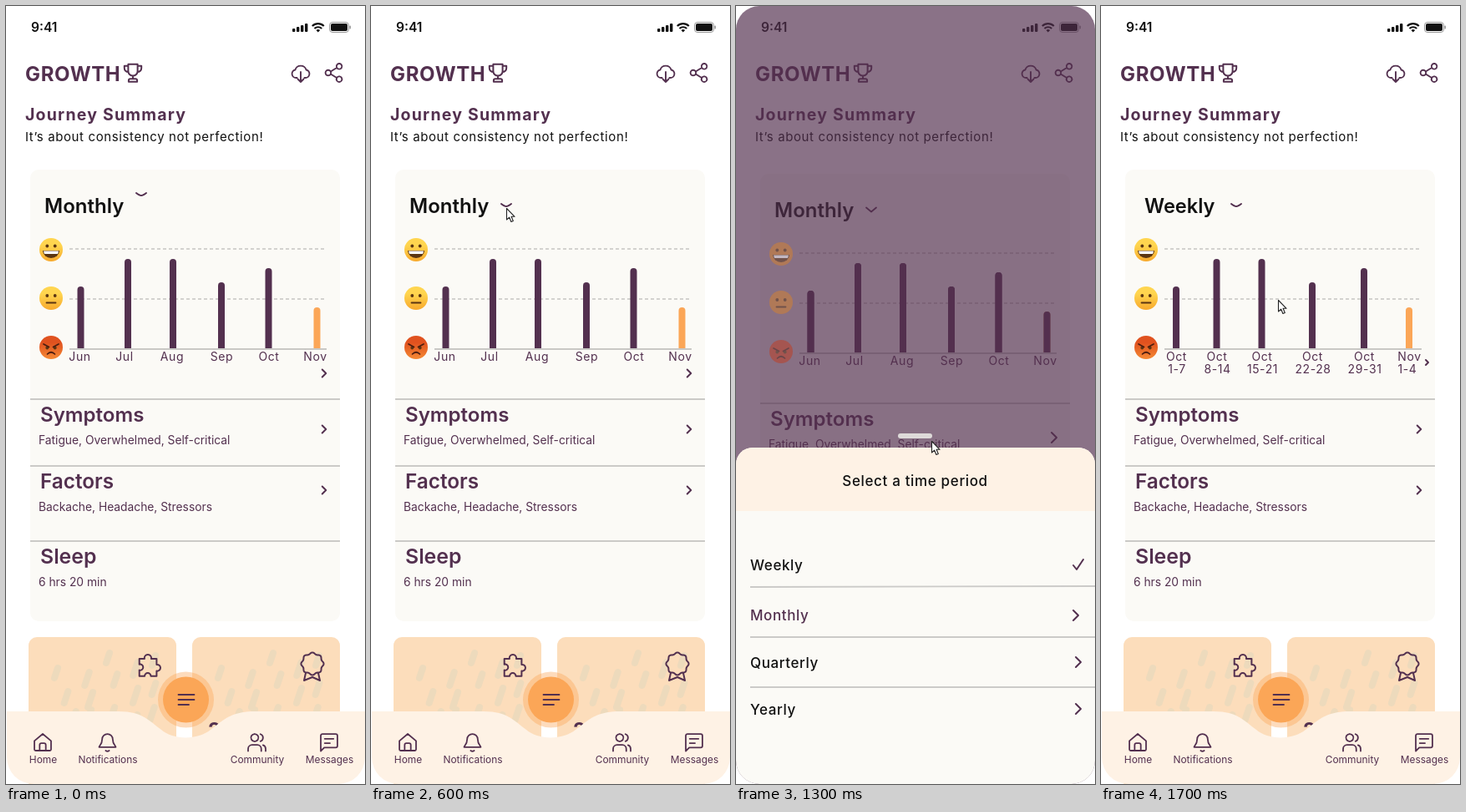
Recreate the animation shown at these times as an HTML page. Size 430x932 px, loop 1800 ms.

```html
<!DOCTYPE html>
<html lang="en">
<head>
<meta charset="utf-8">
<title>Growth journey</title>
<style>
html, body { margin: 0; width: 100%; height: 100%; overflow: hidden; background: #fff; }
svg { display: block; width: 430px; height: 932px; font-family: Inter, "Open Sans", sans-serif; }
</style>
</head>
<body>
<svg id="stage" viewBox="0 0 430 932" xmlns="http://www.w3.org/2000/svg"></svg>
<script>
const PLUM = '#53304f', INK = '#111', PAPER = '#fbfaf6', PEACH = '#fcddbb', ORANGE = '#fba657';
const stage = document.getElementById('stage');

// --- drawing helpers ---
const text = (x, y, str, size, o = {}) =>
  `<text x="${x}" y="${y}" font-size="${size}" fill="${o.fill || PLUM}" font-weight="${o.w || 400}" ` +
  `letter-spacing="${o.ls || 0}" text-anchor="${o.mid ? 'middle' : 'start'}"` +
  `${o.line ? ' text-decoration="underline"' : ''}>${str}</text>`;
const rect = (x, y, w, h, r, fill) =>
  `<rect x="${x}" y="${y}" width="${w}" height="${h}" rx="${r}" fill="${fill}"/>`;
const disc = (x, y, r, fill) => `<circle cx="${x}" cy="${y}" r="${r}" fill="${fill}"/>`;
const line = (d, w = 2, color = PLUM, extra = '') =>
  `<path d="${d}" fill="none" stroke="${color}" stroke-width="${w}" stroke-linejoin="round" ${extra}/>`;
const pen = (d, w = 2, color = PLUM) => line(d, w, color, 'stroke-linecap="round"');
const icon = (d, x, y, k = 1, w = 1.9) =>
  `<g transform="translate(${x} ${y}) scale(${k}) translate(-12 -12)">${pen(d, w / k)}</g>`;
const group = (id, body) => `<g id="${id}">${body}</g>`;
const next = (x, y, h = 9) => pen(`M${x - h / 4} ${y - h / 2}l${h / 2} ${h / 2}l${-h / 2} ${h / 2}`);
const tick = (x, y) => pen(`M${x - 6} ${y + 1}l4 5 8-12`);

// --- icons on a 24 unit box ---
const ICON = {
  cup: 'M6.5 2h11v8a5.5 5.5 0 0 1-11 0zM6.5 4H2v2.5A4.5 4.5 0 0 0 6.7 11M17.5 4H22v2.5a4.5 4.5 0 0 1-4.7 4.5M12 15.5V19M7 22.5V21a2 2 0 0 1 2-2h6a2 2 0 0 1 2 2v1.5z',
  cloud: 'M7.5 17H6.500A4.8 4.8 0 0 1 5.4 7.5a6.9 6.9 0 0 1 13.2 0A4.8 4.8 0 0 1 17.5 17h-1M12 10v12M8.5 18.5l3.5 3.5 3.5-3.5',
  share: 'M18 2a3 3 0 1 0 .01 0M6 9a3 3 0 1 0 .01 0M18 16a3 3 0 1 0 .01 0M8.7 10.6l6.6-4M8.7 13.4l6.6 4',
  home: 'M2.5 10.5 12 2.5l9.5 8V20a1.5 1.5 0 0 1-1.5 1.5H4A1.5 1.5 0 0 1 2.5 20zM8.5 21.5V15a2 2 0 0 1 2-2h3a2 2 0 0 1 2 2v6.5',
  bell: 'M18 8.5a6 6 0 0 0-12 0c0 6-3.5 7.5-3.5 9h19c0-1.5-3.5-3-3.5-9M10 21.5q2 1.5 4 0',
  people: 'M2 22v-2.5a4.5 4.5 0 0 1 4.5-4.5h6a4.5 4.5 0 0 1 4.5 4.5V22M9.5 2.5a4.3 4.3 0 1 0 .01 0M16 2.7a4.3 4.3 0 0 1 0 8.2M22 22v-2.5a4.5 4.5 0 0 0-3-4.2',
  chat: 'M2.5 22V4.5a2 2 0 0 1 2-2h15a2 2 0 0 1 2 2v11.5a2 2 0 0 1-2 2H6.5zM7 8h10M7 13h6',
  puzzle: 'M2 7h4.5a3 3 0 1 1 5.8 0H17v5a2.8 2.8 0 1 1 0 5.5V22h-5a2.7 2.7 0 1 0-5.4 0H2v-5.2a2.6 2.6 0 1 0 0-5z',
  heart: 'M12 22 3 13A6 6 0 0 1 12 5a6 6 0 0 1 9 8zM7.5 12h2l1.5-3 2 6 1.5-3h2',
  book: 'M12 5.5Q10 2.5 7 2.5H2V19h6q3 0 4 2.5 1-2.5 4-2.5h6V2.5h-5q-3 0-5 3zV21',
  goal: 'M14 2.3A10 10 0 1 0 21.7 10M13 6.6A5.6 5.6 0 1 0 17.4 11M12 12l6-6V2.5l3-1.5.5 2.5 2 .5-2 3H18M12 11.5v1'
};

// --- faces, drawn around 0,0 with radius 14 ---
const eyes = (y, r) => disc(-4.7, y, r, '#5b3512') + disc(4.7, y, r, '#5b3512');
const face = (x, y, fill, body, k = 1) =>
  `<g transform="translate(${x} ${y}) scale(${k})">${disc(0, 0, 14, fill) + body}</g>`;
const grin = '<path d="M-10 1H10A10 9 0 0 1-10 1" fill="#5b3512"/><path d="M-9 1.5H9L8 5H-8z" fill="#fff"/>' + eyes(-4.5, 1.9);
const flat = eyes(-3, 1.9) + pen('M-5.5 5.5h11', 1.8, '#5b3512');
const cross = eyes(.5, 1.9) + pen('M-9-4l6.5 3.5M9-4 2.5-.5M-4.5 8q4.5-4.5 9 0', 1.7, '#4c1d10');
const cool = '<path d="M-13-5H13V-2Q11 4 6 3 2 2 1-2H-1Q-2 2-6 3-11 4-13-2z" fill="#2b2522"/>' + pen('M-6 6q6 5 12 0', 1.6, '#5b3512');
const moods = (good, bad) => face(54, 292, good, grin) + face(54, 350, good, flat) + face(54, 409, bad, cross);

// --- chart ---
const TOPS = [336, 303, 303, 331, 314, 361];
const bars = (xs, last) => xs.map((x, i) =>
  `<path d="M${x - 4} 410V${TOPS[i] + 4}a4 4 0 0 1 8 0V410z" fill="${i == 5 ? last : PLUM}"/>`).join('');
const label = (x, y, s) => text(x, y, s, 14, { mid: 1, ls: .6 });
const MONTH_X = [89.5, 146, 200, 258, 314.5, 372.5], WEEK_X = [90, 138.5, 192.5, 253, 315, 369];
const monthNames = [['Jun', 88.5], ['Jul', 142], ['Aug', 199], ['Sep', 258.5], ['Oct', 315], ['Nov', 370.5]]
  .map(([s, x]) => label(x, 425, s)).join('');
const weekNames = ['1-7', '8-14', '15-21', '22-28', '29-31', '1-4'].map((s, i) =>
  label(WEEK_X[i] + .5, 425, i < 5 ? 'Oct' : 'Nov') + label(WEEK_X[i] + (i < 5 ? 1 : -2), 440, s)).join('');

const section = (y, name, detail, size) =>
  line(`M29 ${y}H400`, 2, '#cbcac7') + text(41, y + 27, name, size, { w: 600 }) + text(39, y + 54, detail, 13.8);

const summary =
  rect(29, 196, 371, 541, 10, PAPER) +
  line('M76 291H384M76 351H384', 1.6, '#c6c5c2', 'stroke-dasharray="4 3"') +
  section(471, 'Symptoms', 'Fatigue, Overwhelmed, Self-critical', 24.1) +
  section(551, 'Factors', 'Backache, Headache, Stressors', 24.3) +
  section(641, 'Sleep', '6 hrs 20 min', 24.8) +
  group('monthly', text(46, 248, 'Monthly', 24, { w: 600, fill: INK }) + bars(MONTH_X, ORANGE) + monthNames) +
  group('dimBar', bars(MONTH_X, PLUM)) +
  group('weekly', text(52, 248, 'Weekly', 23.6, { w: 600, fill: INK }) + bars(WEEK_X, ORANGE) + weekNames + next(390.5, 427, 6)) +
  line('M76 411H384', 2, '#c9c8c5') +
  group('caret', pen('M156-1.5Q160 1.5 162 1.500 164 1.500 168-1.5')) +
  group('wideCaret', pen('M156 236.500l6 5 6-5', 1.8)) +
  group('arrows', next(381, 507) + next(381, 580)) +
  group('chartArrow', next(381, 440)) +
  group('bigArrows', next(381, 512, 12) + next(381, 597, 12) + next(381, 690, 12));

// --- lower half ---
const STREAKS = [[33, 43], [45, 72], [70, 50], [74, 75], [95, 25], [104, 51], [128, 38], [128, 70], [150, 28],
  [150, 62], [54, 97], [72, 96], [101, 90], [128, 100], [148, 92], [35, 122], [55, 142], [90, 128], [118, 120], [140, 130], [104, 148]];
const streaks = STREAKS.map(([x, y], i) => {
  const h = 6 + i * 5 % 4;
  return `M${x + h / 3} ${y - h}L${x - h / 3} ${y + h}`;
}).join('');
const card = (x, num, name, ls) => `<g transform="translate(${x} 116)">` + rect(0, 0, 177, 183.5, 10, PEACH) +
  pen(streaks, 8, 'rgba(214,212,188,.42)') + text(19, 120, num, 24, { w: 700 }) +
  text(19.5, 146, name, 13, { ls, fill: '#35202f' }) + '</g>';
const badge = Array.from({ length: 73 }, (_, i) => {
  const a = i * Math.PI / 36, r = 12.7 + .9 * Math.cos(8 * a);
  return (i ? 'L' : 'M') + (369 + r * Math.cos(a)).toFixed(1) + ' ' + (148 + r * Math.sin(a)).toFixed(1);
}).join('') + 'M361 159l-2 9 10-4 9 4-2-9';

const ring = (x, y, color, part) => {
  const r = 28.75, len = 2 * Math.PI * r;
  const arc = (c, dash) => `<circle cx="${x}" cy="${y}" r="${r}" fill="none" stroke="${c}" stroke-width="17.5" ` +
    `stroke-dasharray="${dash}" transform="rotate(-90 ${x} ${y})"/>`;
  return disc(x, y, 21, '#fff') + arc('#bbb7b5', 'none') + arc(color, `${len * part} ${len}`);
};
const caption = (x, a, b) => text(x, 457, a, 14, { mid: 1 }) + text(x, 472, b, 14, { mid: 1 });
const task = (y, name, pic, from, to, dashY) => icon(ICON[pic], 50, y - 8, 1.15, 2) +
  text(72, y, name, 19, { ls: .5 }) + line(`M${from} ${dashY}H${to}`, 2, PLUM, 'stroke-dasharray="5 3"');
const tally = (x, y, num, unit, fill, dy = 0) =>
  text(277, y + dy, num, 22.5, { w: 700, fill }) + text(x, y, unit, 20, { fill, ls: .6 });
const zed = (x, y, s) => text(x, y, 'Z', s, { w: 800, fill: '#1754c4' });

const lower =
  card(29, '15', 'In Progress Journey', .3) + card(225, '22', 'Goals completed', .4) +
  icon(ICON.puzzle, 175.5, 149, 1.38, 2) + pen(badge, 2) +
  rect(28, 322, 372, 366, 10, PAPER) +
  text(39, 348, 'PROGRESS', 16, { w: 500, ls: 1.1 }) + text(349, 348, 'More', 14, { ls: .4, line: 1 }) +
  ring(115.5, 403, ORANGE, .76) + ring(215.5, 403, 'url(#red)', .54) + ring(314.5, 402, 'url(#blue)', .54) +
  '<path d="M106 391q5-4 8 0l-1 5q-3 0-3 3l2 6q5-6 11-2 5 4 3 11-10 4-23 0 0-10 3-23z" fill="#f6b93c" stroke="#c98a22" stroke-width=".8"/>' +
  face(214.5, 403, 'url(#sun)', cool, .8) +
  zed(301, 414, 17) + zed(311.5, 405, 13) + zed(319, 397, 10) +
  caption(113, 'Boost my', 'energy') + caption(213, 'Build', 'confidence') + caption(312.5, 'Power', 'nap') +
  text(38, 517, 'KEEP IT UP!', 16, { w: 500, ls: .8 }) + text(346, 516, 'Today', 14, { ls: .4, line: 1 }) +
  task(559, 'MOVEMENT', 'heart', 199, 267, 549) + task(598, 'MAKE FOOD', 'book', 201, 268, 586.5) +
  task(640, 'GOALS DONE', 'goal', 214, 270, 632) +
  tally(312, 560, '45', 'min', '#95a988') + tally(293, 598, '1', 'dish', '#d8b27a') +
  tally(309.5, 640, '15', 'finished', '#c4361d', 3) +
  text(183, 674, 'more', 17, { w: 500, ls: .6 }) + pen('M232 667.5q6 6 12 0', 2.2) +
  rect(29, 712, 164, 84, 10, PAPER) + rect(218, 712, 184, 84, 10, PAPER) +
  text(49, 736.5, 'Total\u00a0 Adventure Days', 11.4, { w: 600, fill: INK, ls: .05 }) +
  text(241, 736.5, 'Total Events attended', 11.5, { w: 600, fill: INK, ls: .65 }) +
  text(67, 777.5, '28 Days', 22.5, { w: 600, fill: INK }) + text(260.5, 779, '2 Events', 22.8, { w: 600, fill: INK });

// --- fixed parts ---
const header =
  text(30, 31, '9:41', 15.6, { w: 600, fill: INK }) +
  [4, 6, 8, 10].map((h, i) => rect(343 + i * 5, 31 - h, 3.4, h, 1, INK)).join('') +
  line('M366.8 24a10 10 0 0 1 14 0M369.5 27a6.3 6.3 0 0 1 8.7 0', 2.2, INK) +
  '<path d="M371.5 29a3.5 3.5 0 0 1 4.7 0l-2.4 2.5z" fill="#111"/>' +
  '<rect x="387.5" y="19.5" width="23" height="12" rx="3.5" fill="none" stroke="#999"/>' +
  rect(389, 21, 20, 9, 2, INK) + rect(411.5, 23.5, 1.5, 4, .7, '#999') +
  text(23, 90, 'GROWTH', 24, { w: 700, ls: .65 }) + icon(ICON.cup, 152, 80, 1.02, 2) +
  icon(ICON.cloud, 353, 81, 1) + icon(ICON.share, 392.5, 80, 1.1);
const title = text(23, 137, 'Journey Summary', 19.5, { w: 700, ls: 1.2 }) +
  text(23, 162, 'It’s about consistency not perfection!', 15, { ls: .62, fill: INK });
const tab = (x, pic, name) => icon(ICON[pic], x, 882, 1.05, 1.8) + text(x + .5, 907, name, 11.9, { mid: 1 });
const nav =
  '<path d="M1 845H135C164 845 172 857 186 867 200 879.5 230 879.5 245 867 259 857 268 845 298 845H430V900A32 32 0 0 1 398 932H33A32 32 0 0 1 1 900z" fill="#fef2e5"/>' +
  disc(215.5, 831, 33.5, 'rgba(251,166,87,.4)') + disc(215.5, 831, 27.5, ORANGE) +
  pen('M206.5 825H225.5M206.5 831H225.5M206.5 837H219', 1.8) +
  tab(44, 'home', 'Home') + tab(121.5, 'bell', 'Notifications') + tab(300.5, 'people', 'Community') + tab(387, 'chat', 'Messages');
const row = (y, name, fill) => text(17, y, name, 17, { w: 500, ls: .6, fill });
const sheet =
  rect(194, -17, 41, 6, 3, '#dedad9') +
  '<path d="M0 420V20A20 20 0 0 1 20 0H410A20 20 0 0 1 430 20V420z" fill="#fbfaf6"/>' +
  '<path d="M0 76V20A20 20 0 0 1 20 0H410A20 20 0 0 1 430 20V76z" fill="#fef2e5"/>' +
  text(214.5, 46, 'Select a time period', 17, { w: 500, mid: 1, ls: .65, fill: INK }) +
  row(147, 'Weekly', INK) + row(207, 'Monthly', PLUM) + row(264, 'Quarterly', INK) + row(320, 'Yearly', INK) +
  line('M17 167 430 166M17 227H430M17 287H430', 1.8, '#cbcac8') +
  group('pickMonth', next(410, 140, 12) + tick(407, 201)) + group('pickWeek', tick(410, 140) + next(407, 201, 12)) +
  next(410, 257, 12) + next(410, 313, 12);

const fade = (id, a, b) => `<linearGradient id="${id}" x1="0" y1="0" x2="0" y2="1">` +
  `<stop offset=".3" stop-color="${a}"/><stop offset="1" stop-color="${b}"/></linearGradient>`;
stage.innerHTML =
  '<defs><clipPath id="phone"><rect width="430" height="932" rx="28"/></clipPath>' +
  fade('red', '#f08a70', '#e2442b') + fade('blue', '#5d96e4', '#1450bf') +
  fade('sun', '#ffd54f', '#f7a92d') + fade('mad', '#e0521f', '#f58a35') + '</defs>' +
  '<g clip-path="url(#phone)">' +
  group('upper', group('title', title) + group('panel', summary)) +
  group('lower', lower) + header + group('nav', nav) +
  group('shade', rect(0, 0, 430, 932, 0, PLUM)) +
  group('moods', moods('url(#sun)', 'url(#mad)')) + group('dimMoods', moods('#d9822b', '#c23a1c')) +
  group('sheet', sheet) + '</g>' +
  group('cursor', '<path d="M0 0V13.5L3.2 10.7 5.4 16 7.8 15 5.6 9.8H9.6z" fill="#fff" stroke="#222" stroke-width="1.1" stroke-linejoin="round"/>');

// --- motion ---
const el = id => document.getElementById(id);
const move = (id, x, y) => el(id).setAttribute('transform', `translate(${x} ${y})`);
const alpha = (id, v) => el(id).setAttribute('opacity', v);
const show = (id, on) => el(id).setAttribute('display', on ? 'inline' : 'none');
function track(keys, t) {
  let i = 0;
  while (i < keys.length - 2 && t > keys[i + 1][0]) i++;
  const [t0, a] = keys[i], [t1, b] = keys[i + 1];
  const p = Math.min(1, Math.max(0, (t - t0) / (t1 - t0)));
  return a + (b - a) * p * p * (3 - 2 * p);
}
const SCROLL = [[0, 0], [200, 1], [600, 0]];
const SHADE = [[600, 0], [800, .68], [1500, .68], [1700, 0]];
const SHEET_Y = [[600, 950], [800, 713], [900, 713], [1100, 529], [1300, 529], [1500, 960]];
const CURSOR_X = [[500, 190], [600, 162], [700, 162], [900, 246], [1100, 234], [1200, 62], [1300, 234], [1500, 234], [1700, 212]];
const CURSOR_Y = [[500, 330], [600, 242], [700, 242], [900, 702], [1100, 522], [1200, 670], [1300, 521], [1500, 521], [1700, 352]];

function draw(t) {
  const s = track(SCROLL, t), shade = track(SHADE, t), y = track(SHEET_Y, t);
  const modal = t >= 700 && t < 1600, week = t >= 1600, drop = modal ? 5 : 0;
  move('upper', 0, -640 * s);
  alpha('upper', 1 - s);
  move('panel', 0, drop);
  move('lower', 2 * s - 2, 640 * (1 - s) + (modal ? 27 : 0));
  move('moods', 0, -640 * s);
  alpha('moods', 1 - s);
  show('moods', !modal);
  move('dimMoods', 0, drop);
  alpha('dimMoods', 1 - shade * .74);
  show('dimMoods', modal);
  move('caret', 0, t < 600 ? 225.5 : 238.5);
  show('caret', !modal);
  show('wideCaret', modal);
  show('monthly', !week);
  show('weekly', week);
  show('dimBar', modal);
  show('arrows', !modal);
  show('chartArrow', !modal && !week);
  show('bigArrows', modal);
  alpha('nav', 1 - shade / .68);
  alpha('shade', shade);
  show('sheet', modal && y < 949);
  move('sheet', 3 * Math.min(1, Math.max(0, (y - 529) / 184)), y);
  show('pickMonth', t < 1200);
  show('pickWeek', t >= 1200);
  show('cursor', t >= 500);
  move('cursor', track(CURSOR_X, t) + .5, track(CURSOR_Y, t) + .5);
}
function tickFrame() {
  draw(Math.floor(performance.now() % 1800 / 100) * 100);
  requestAnimationFrame(tickFrame);
}
tickFrame();
</script>
</body>
</html>
```
